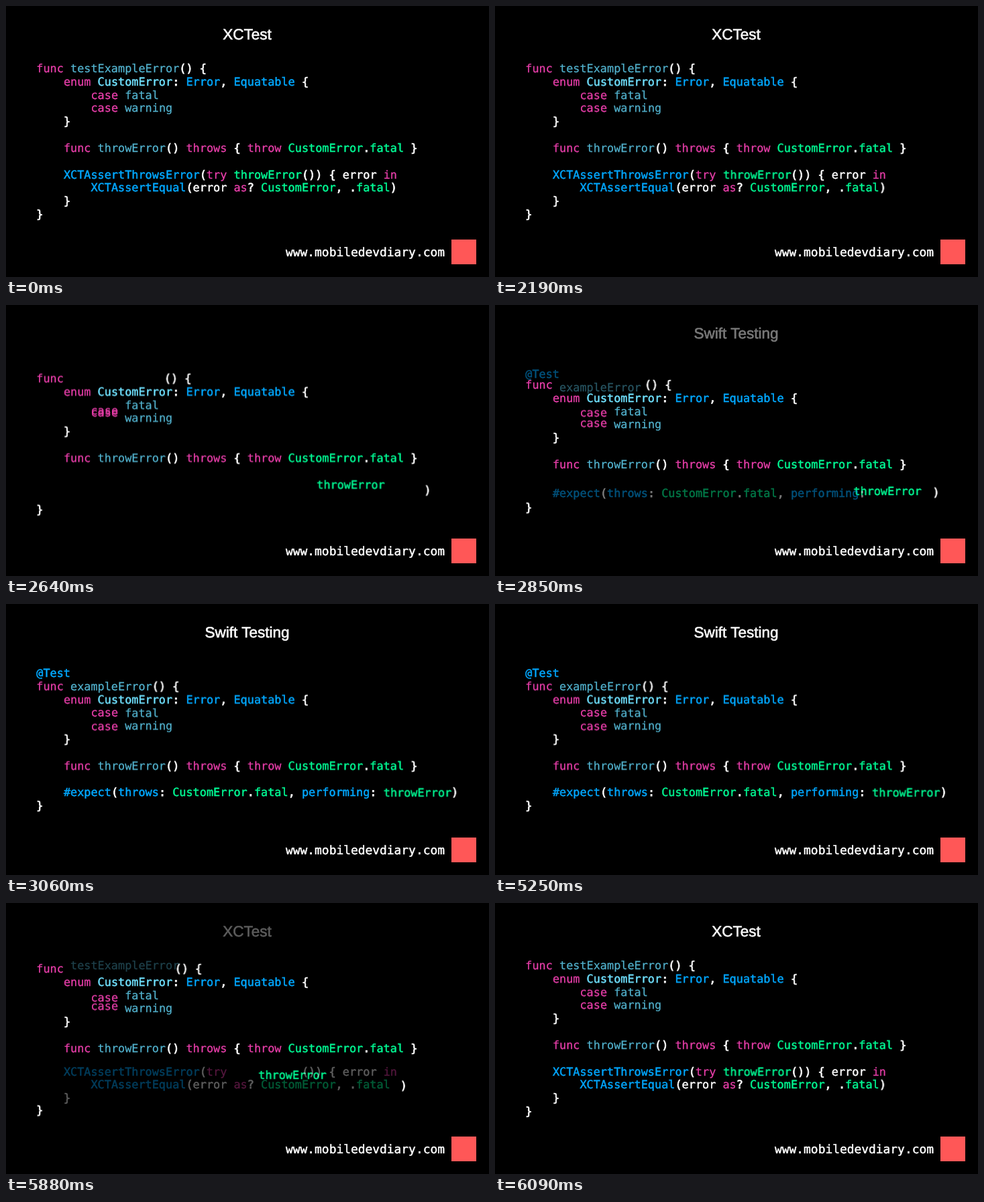
An HTML page for the animation above (6120 ms loop, 720 px wide and 405 px high).

```html
<!DOCTYPE html>
<html lang="en">
<head>
<meta charset="utf-8">
<title>XCTest and Swift Testing</title>
<style>
  html, body { margin: 0; width: 100%; height: 100%; overflow: hidden; background: #000; }
  svg { display: block; width: 100vw; height: 100vh; }
  text { white-space: pre; text-rendering: geometricPrecision; color: #fff; }
  text, tspan { fill: currentColor; stroke: currentColor; stroke-width: .5px; }
  .code { font: 16.85px "DejaVu Sans Mono", monospace; }
  .url { font: 17.9px "DejaVu Sans Mono", monospace; }
  .title { font: 22.5px "Liberation Sans", sans-serif; text-anchor: middle; stroke-width: .65px; }
  .p { color: #ea3fab; stroke-width: .3px; }
  .f { color: #53b4d0; stroke-width: .25px; }
  .c { color: #70e2ff; }
  .b { color: #00a8ff; }
  .g { color: #00f893; }
  .w { stroke-width: .75px; }
</style>
</head>
<body>
<svg viewBox="0 0 720 405">
  <rect width="720" height="405"/>
  <g id="stage"></g>
  <text class="url" x="417" y="374">www.mobiledevdiary.com</text>
  <rect x="664" y="349" width="37" height="37" fill="#ff5757"/>
</svg>
<script>
const LOOP = 6120, MOVE = 900, FADE = 405;
const TO_SWIFT = 2160, TO_XCTEST = 5220;
const LEFT = 45.3, TOP = 99, CHAR = 10.145, LINE = 19.82;
const EASE = 'cubic-bezier(.364, 0, .636, 1)';
const stage = document.getElementById('stage');

function make(tag, parent, attrs = {}) {
  const node = document.createElementNS('http://www.w3.org/2000/svg', tag);
  for (const name in attrs) node.setAttribute(name, attrs[name]);
  return parent.appendChild(node);
}

// Each step is [time, style]
function play(node, steps) {
  node.animate(
    steps.map(([time, style]) => ({ offset: time / LOOP, easing: EASE, ...style })),
    { duration: LOOP, iterations: Infinity }
  );
}

// Parts are split by "~"; the first letter of each is its colour class
function code([line, col], parts) {
  const text = make('text', stage, { class: 'code', x: LEFT + col * CHAR, y: TOP + line * LINE });
  for (const part of parts.split('~'))
    make('tspan', text, { class: part[0] }).textContent = part.slice(1);
  return text;
}

function title(label) {
  const text = make('text', stage, { class: 'title', x: 359.5, y: 50 });
  text.textContent = label;
  return text;
}

function moving(from, to, parts) {
  const home = { transform: 'translate(0px, 0px)' };
  const dx = (to[1] - from[1]) * CHAR, dy = (to[0] - from[0]) * LINE;
  const away = { transform: `translate(${dx}px, ${dy}px)` };
  play(code(from, parts), [
    [0, home], [TO_SWIFT, home], [TO_SWIFT + MOVE, away],
    [TO_XCTEST, away], [TO_XCTEST + MOVE, home]
  ]);
}

const on = { opacity: 1 }, off = { opacity: 0 };

function xctestOnly(node) {
  play(node, [
    [0, on], [TO_SWIFT, on], [TO_SWIFT + FADE, off],
    [LOOP - FADE, off], [LOOP, on]
  ]);
}

function swiftOnly(node) {
  const shown = TO_SWIFT + MOVE;
  play(node, [
    [0, off], [shown - FADE, off], [shown, on],
    [TO_XCTEST, on], [TO_XCTEST + FADE, off], [LOOP, off]
  ]);
}

// The second layout sits half a line lower
moving([0, 0], [1.5, 0], 'pfunc');
moving([0, 21], [1.5, 17], 'w() {');
moving([1, 4], [2.5, 4], 'penum ~cCustomError~w: ~bError~w, ~bEquatable~w {');
moving([2, 8], [4.5, 8], 'pcase');
moving([3, 8], [3.5, 8], 'pcase');
moving([2, 13], [3.5, 13], 'ffatal');
moving([3, 13], [4.5, 13], 'fwarning');
moving([4, 4], [5.5, 4], 'w}');
moving([6, 4], [7.5, 4], 'pfunc ~fthrowError~w() ~pthrows~w { ~pthrow ~gCustomError~w.~gfatal~w }');
moving([8, 29], [9.5, 51], 'gthrowError');
moving([9, 52], [9.5, 61], 'w)');
moving([11, 0], [10.5, 0], 'w}');

xctestOnly(title('XCTest'));
xctestOnly(code([0, 5], 'ftestExampleError'));
xctestOnly(code([8, 4], 'bXCTAssertThrowsError~w(~ptry'));
xctestOnly(code([8, 39], 'w()) { ~nerror ~pin'));
xctestOnly(code([9, 8], 'bXCTAssertEqual~w(~nerror ~pas~w? ~gCustomError~w, .~gfatal'));
xctestOnly(code([10, 4], 'w}'));

swiftOnly(title('Swift Testing'));
swiftOnly(code([0.5, 0], 'b@Test'));
swiftOnly(code([1.5, 5], 'fexampleError'));
swiftOnly(code([9.5, 4], 'b#expect~w(~bthrows~w: ~gCustomError~w.~gfatal~w, ~bperforming~w:'));
</script>
</body>
</html>
```
